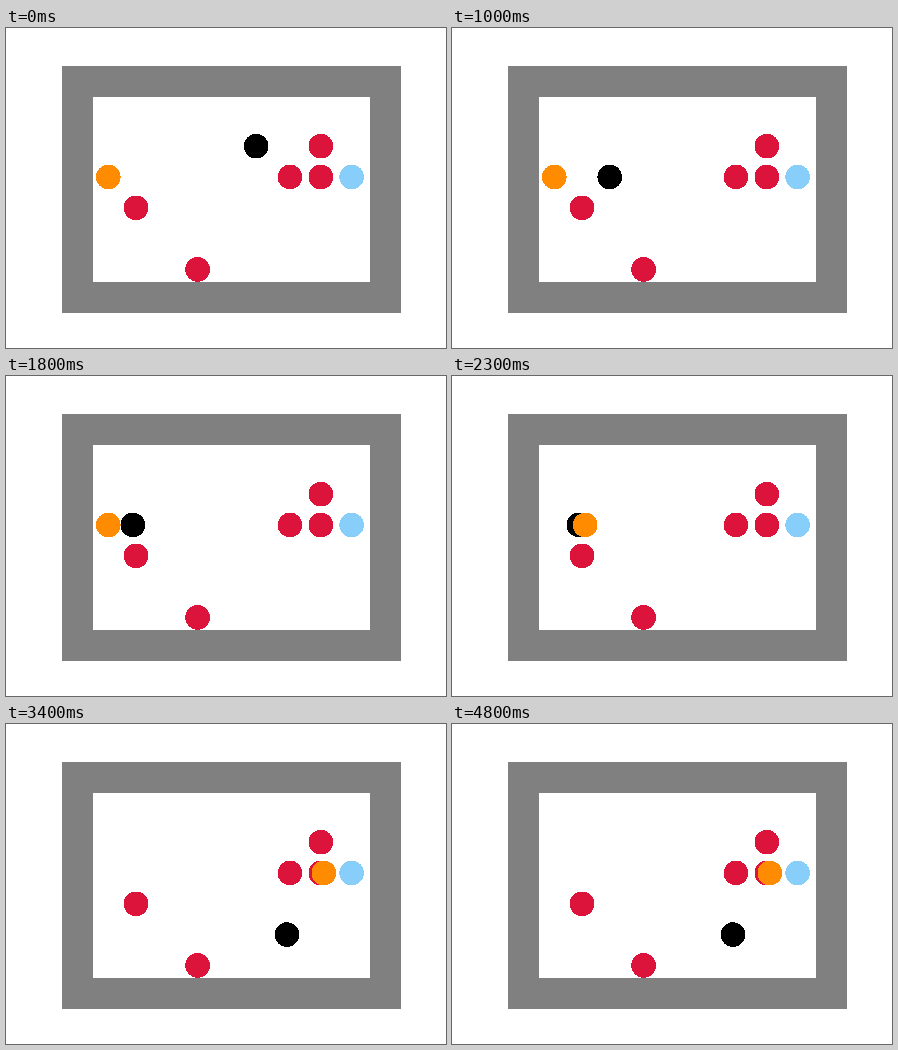
An HTML page for the animation above (5 s loop, 440x320 px).

```html
<!DOCTYPE html>
<html lang="en">
<head>
<meta charset="utf-8">
<title>Grid world</title>
<style>
  html, body { margin: 0; width: 100%; height: 100%; overflow: hidden; background: #fff; }
  svg { display: block; width: 440px; height: 320px; }
</style>
</head>
<body>
<svg id="stage" viewBox="0 0 440 320" shape-rendering="crispEdges">
  <rect x="56" y="38" width="339" height="247" fill="#808080"/>
  <rect x="87" y="69" width="277" height="185" fill="#fff"/>
</svg>
<script>
const CELL = 30.8, LOOP = 5000;
const LEFT = 102.3, TOP = 87.4, SHIFT = 3.08;
const stage = document.getElementById('stage');

// Each layer sits slightly further left than the one above it.
function place(disc, col, row, layer) {
  disc.setAttribute('cx', LEFT + col * CELL - layer * SHIFT);
  disc.setAttribute('cy', TOP + row * CELL);
}

function addDisc(color, col, row, layer) {
  const disc = document.createElementNS('http://www.w3.org/2000/svg', 'circle');
  disc.setAttribute('r', 0.4 * CELL);
  disc.setAttribute('fill', color);
  place(disc, col, row, layer);
  return stage.appendChild(disc);
}

const agent = addDisc('#000', 5, 1, 2);
for (const [col, row] of [[1, 3], [3, 5], [6, 2], [7, 2], [7, 1]]) {
  addDisc('#dc143c', col, row, 1);
}
addDisc('#87cefa', 8, 2, 1);
const cargo = addDisc('#ff8c00', 0, 2, 0);

// Runs of moves, one cell per 100 ms: [start, 'col row' pairs].
const path = [
  [0, '51'],
  [200, '42 32 23 12 22'],
  [800, '12'],
  [1000, '22 32 22 12 22 32 22 32 12 22 32 12'],
  [2200, '02 12 22 32 42 52 62 72 62 63'],
  [3400, '64'],
  [3600, '53 44'],
  [4000, '54 63 54'],
  [4400, '53'],
  [4600, '63'],
  [4800, '64']
].flatMap(([start, cells]) =>
  cells.split(' ').map((c, i) => ({ at: start + i * 100, col: +c[0], row: +c[1] })));

const PICK = 2200, DROP = 2900;

function cellAt(t) {
  let cell = path[0];
  for (const step of path) if (step.at <= t) cell = step;
  return cell;
}

function draw(t) {
  const pos = cellAt(t);
  const load = t < PICK ? { col: 0, row: 2 } : cellAt(Math.min(t, DROP));
  place(agent, pos.col, pos.row, 2);
  place(cargo, load.col, load.row, 0);
}

const begin = performance.now();
function tick() {
  draw((performance.now() - begin) % LOOP);
  requestAnimationFrame(tick);
}
tick();
</script>
</body>
</html>
```
